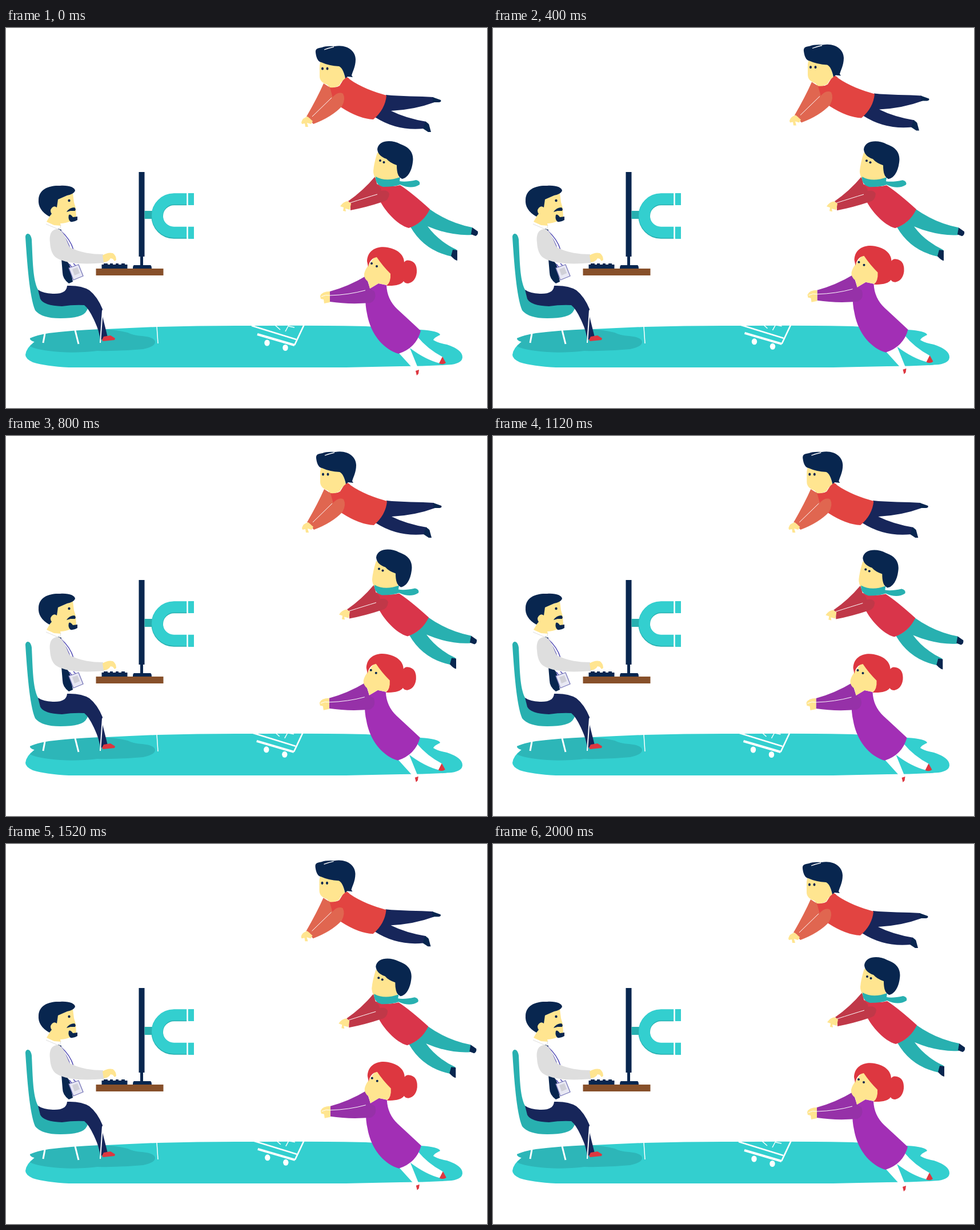
Write an HTML page that moves like this. It is 842 px wide and 665 px high and loops after 2.08 s.

```html
<!DOCTYPE html>
<html lang="en">
<head>
<meta charset="utf-8">
<title>Customer magnet</title>
<style>
html, body { margin: 0; width: 100%; height: 100%; overflow: hidden; background: #fff }
svg { display: block; width: 842px; height: 665px }
.navy { fill: #08264f }
.trouser { fill: #17265a }
.skin { fill: #ffe590 }
.teal { fill: #33cfcf }
.deep { fill: #28b0b0 }
.red { fill: #dd3740 }
.line { fill: none; stroke: #fff }
</style>
</head>
<body>
<svg viewBox="0 0 842 665">
  <!-- ground and shadow -->
  <path class="teal" d="M42 543Q58 536 100 532Q180 526 265 523Q350 520.5 430 521Q560 520 630 522Q660 523 690 527L725 528Q758 530 760 537Q749 542 748 546Q756 551 772 554Q799 563 799 576Q799 586 780 589Q740 592 690 592Q640 593 595 594L110 594Q70 592 47 585Q34 579 34 572Q35 560 50 549Q42 547 42 543Z"/>
  <path fill="#2db6b8" d="M42 543Q55 537 75 534Q115 529 165 527Q190 527 213 533Q222 538 238 539Q261 541 261 550Q260 558 240 562Q200 566 160 565Q125 569 95 567Q55 564 42 557L50 549Q42 547 42 543Z"/>
  <g class="line">
    <path stroke-width="3" d="M68 535L65 551M121 529L127 553"/>
    <path stroke-width="1.5" d="M264 522L266 552"/>
  </g>

  <!-- seated man -->
  <path class="deep" d="M34 366C34 358 43 357 45 370C47 410 47 440 56 458L66 478L138 484Q146 489 141 495Q135 508 95 508Q62 508 51 494C41 470 37 410 34 366Z"/>
  <path class="trouser" d="M107 451Q132 450 146 459Q160 470 169 492L168 501L178 541L165 546Q163 530 156 515Q146 492 137 485Q118 484 98 487Q66 486 60 474L56 458Q64 464 82 465Q106 466 107 451Z"/>
  <path class="red" d="M168 546L171 540L183 538L191 543L190 546L170 548Z"/>
  <path class="line" stroke-width="2" d="M169 494L165 551"/>
  <path class="navy" d="M97 404Q109 406 112 417L117 444L110 447Q99 439 99 428ZM91 351L97 353L96 358Z"/>
  <path fill="none" stroke="#504ab4" stroke-width="1.5" d="M92 353Q109 370 113 390M95 354Q113 370 118 388M111 413L116 420M118 412L122 416"/>
  <path fill="#dedede" d="M77 375C75 358 82 351 92 352C103 357 106 374 112 384C130 393 150 396 170 396L172 411C140 414 105 413 88 402Q78 395 77 375Z"/>
  <path fill="#e8e8f4" stroke="#7777b8" stroke-width="1.3" d="M110 420L127 414L135 434L118 441Z"/>
  <path fill="#d0d0d8" d="M116 422L125 419L129 429L120 433Z"/>
  <path class="skin" d="M169 398Q178 392 187 394Q193 398 193 406L190 408L187 404L183 403Q180 409 171 410Z"/>
  <path class="skin" d="M90 300L117 289L119 305L122 315L123 331L113 338Q104 342 95 342L96 346L84 345L71 339L78 327Q76 316 82 312Z"/>
  <path fill="none" stroke="#dedede" d="M70 343L91 352M96 345L94 353"/>
  <path class="navy" d="M57 300C58 282 75 275 95 276C110 275 121 279 121 285Q118 291 107 293L91 300L89 314Q84 310 80 315Q76 320 80 325L76 330C62 322 56 312 57 300Z"/>
  <path class="navy" d="M106 322Q111 314 120 314L122 317L121 320L113 320ZM110 327Q113 325 117 331L125 330L125 336Q119 340 113 339Q108 335 110 327Z"/>
  <circle class="navy" cx="110.5" cy="302" r="2.2"/>

  <!-- desk, screen, magnet -->
  <rect x="157.5" y="421" width="118" height="12" fill="#87502a"/>
  <path class="navy" d="M167.5 421V414H171V412H178V414H182V412H187V414H192V412H197V414H202V412H208V414H212.5V421ZM232.5 252H242.5V400H240V415H253Q255 416 255 421H222Q222 416 224 415H235V400H232.5Z"/>
  <rect class="deep" x="242.5" y="320" width="17" height="14"/>
  <g fill="none">
    <path stroke="#28b0b0" stroke-width="20.5" d="M318 300H294A29.3 29.3 0 0 0 294 358.6H318"/>
    <path stroke="#33cfcf" stroke-width="19.5" d="M329 299H294A29.2 29.2 0 0 0 294 357.4H329"/>
    <path stroke="#33cfcf" stroke-width="21" d="M319 299.5H329M319 358.5H329"/>
  </g>
  <path class="line" stroke-width="2.5" d="M317.5 287V312M317.5 346V371"/>

  <!-- man in orange-red -->
  <g id="top">
    <path class="trouser" d="M665 117C690 120 725 119 748 121L750 130Q715 143 674 145Q700 158 736 164L732 176Q685 181 646 156Q661 142 665 117Z"/>
    <path class="navy" d="M747 121L761 126Q763 129 758 130L747 130ZM734 164Q741 167 741 171L744 182L739 182L730 176Z"/>
    <path fill="#e24441" d="M592 88Q596 83 602 90C620 103 645 112 666 118Q664 142 643 160Q618 159 587 139L565 118L565 102Q577 106 584 101Z"/>
    <path fill="#e06650" d="M556 97L567 104L572 122L533 159L526 155Q545 122 556 97ZM570 123Q581 110 590 115Q595 124 588 137Q570 156 538 168L531 160Z"/>
    <path class="line" d="M570 122L536 155"/>
    <path class="skin" d="M517 165Q519 157 528 155L537 163L534 168L527 166L529 173L524 173L523 167L518 168Z"/>
    <path class="skin" d="M549 66L551 56L587 62L590 75L594 88Q585 95 584 100Q577 105 567 104L562 99Q549 95 549 84Z"/>
    <path class="navy" d="M542 43Q541 36 548 35L553 34Q560 31 575 32C598 28 612 41 612 55C612 68 606 78 605 83L607 86L598 85L594 88Q590 70 583 67Q565 66 552 60Q544 59 542 43Z"/>
    <path class="line" d="M557 38Q565 35 574 33M543 53L547 59" stroke-width="1.3"/>
    <g class="navy"><ellipse cx="554" cy="71" rx="2" ry="2.6"/><ellipse cx="562.5" cy="71" rx="2" ry="2.6"/></g>
  </g>

  <!-- man with scarf -->
  <g id="middle">
    <path class="deep" d="M740 316Q775 341 816 349L815 362Q778 364 738 347Q757 373 789 388L781 400Q732 390 708 348Q731 341 740 316Z"/>
    <path class="navy" d="M816 349L826 356Q827 362 822 364L814 361ZM782 388L790 389L790 407Q785 406 779 399Z"/>
    <path fill="#d9354a" d="M649 273Q672 280 690 275Q710 288 742 317Q730 342 705 350C685 345 662 318 655 303Z"/>
    <path fill="#c03848" d="M646 260L650 275Q659 281 656 286L604 308L599 303Q625 285 646 260ZM603 307L655 285Q668 282 671 290Q670 302 660 304Q630 314 603 319Z"/>
    <path class="line" d="M602 306Q630 297 650 291"/>
    <path class="skin" d="M585 312Q590 304 598 303L604 307L602 318L594 316L595 321L590 320L591 314Z"/>
    <path class="skin" d="M650 218L686 230L688 268L652 268Q643 262 643 250Q644 237 650 218Z"/>
    <path class="deep" d="M647 260Q665 270 690 261L689 268Q700 270 718 266Q726 268 724 274Q710 283 690 274Q680 278 660 278Q646 274 647 260Z"/>
    <path class="navy" d="M650 212C652 196 675 195 690 203C710 210 714 222 712 235C710 252 702 263 693 264L689 261Q684 256 684 240Q672 236 666 229Q651 224 650 212Z"/>
    <g class="navy"><circle cx="655" cy="232" r="2"/><circle cx="661.5" cy="235" r="2"/></g>
  </g>

  <!-- woman and trolley -->
  <g id="bottom">
    <g class="line">
      <path stroke-width="2.6" d="M430 521L508 545M505 555L522 519"/>
      <path stroke-width="4" d="M440 536L505 555"/>
      <path stroke-width="1.5" d="M471 520L480 528M489 531L495 520M495 522L505 524"/>
    </g>
    <g fill="#fff">
      <ellipse cx="457" cy="551" rx="4.7" ry="5.5"/><ellipse cx="489" cy="559.5" rx="4.7" ry="5.5"/>
      <path d="M687 568L716 600L722 597L707 560Q735 581 760 587L765 576Q738 562 720 540Z"/>
    </g>
    <path class="red" d="M764 575L770 586Q765 590 758 587ZM717 600L723 598L722 605L719 608Z"/>
    <path fill="#a22fb5" d="M630 434L637 456L652 447L666 450Q667 475 685 492Q710 515 726 530Q718 560 687 570C660 562 638 535 632 500Q627 480 630 434Z"/>
    <path fill="#9631a8" d="M567 461Q600 452 630 434L637 456L645 461Q650 475 638 481Q600 484 567 479Z"/>
    <path class="skin" d="M550 469Q553 461 567 461L567 480L557 482L556 475L551 474Z"/>
    <path class="line" d="M552 470Q560 466 567 468Q600 467 629 459"/>
    <path class="skin" d="M634 416L648 397L675 424Q676 440 667 450L652 447L637 456L634 444Q626 438 627 430Q629 422 634 416Z"/>
    <path class="red" d="M632 408C633 385 655 381 668 384C685 387 697 397 697 410Q700 405 707 407Q720 410 719 428Q717 444 704 447Q698 447 696 443Q690 452 666 451Q674 445 673 430Q659 416 649 401Q637 403 634 418Z"/>
    <g class="navy"><circle cx="640" cy="412" r="2"/><circle cx="649" cy="417" r="2"/></g>
  </g>
</svg>
<script>
const loop = 2080, step = 80;
const times = [0, 400, 800, 1120, 1520, 1680, 2000];
// drift of each flyer at those times
const drift = {
  top: { x: [0, 2, 1, .3, -.5, -1, 0], y: [0, -2.5, -4, -4, -2.7, -1.3, 0] },
  middle: { x: [0, -1, -2, -2.7, -2.7, -1.7, 0], y: [0, .2, .5, 1.5, 2.3, 2, 0] },
  bottom: { x: [0, .5, -1.2, -1.5, .8, 1, 0], y: [0, -2.2, -2.2, -2, -2.2, -.8, 0] }
};

function at(values, t) {
  if (t >= 2000) return values[6];
  const i = times.findIndex(k => k > t) - 1;
  const p = (t - times[i]) / (times[i + 1] - times[i]);
  return values[i] + (values[i + 1] - values[i]) * p;
}

function draw(now) {
  const t = Math.floor(now % loop / step) * step;
  for (const id in drift) {
    const { x, y } = drift[id];
    document.getElementById(id).setAttribute('transform', `translate(${at(x, t)} ${at(y, t)})`);
  }
  requestAnimationFrame(draw);
}
draw(performance.now());
</script>
</body>
</html>
```
